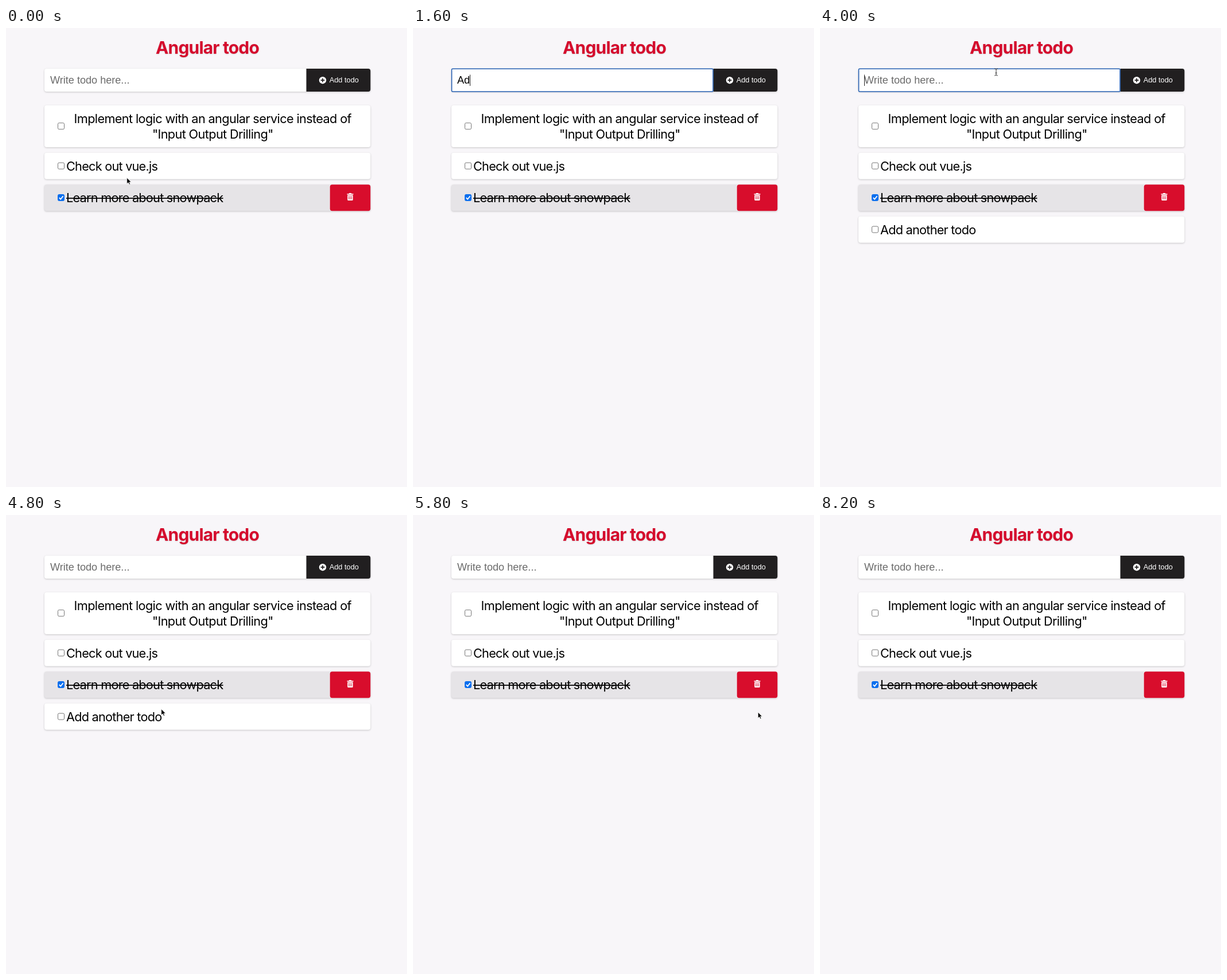
Animation, 699 px wide and 801 px high, one loop 8.4 s. Source, as an HTML page:

```html
<!DOCTYPE html>
<html lang="en">
<head>
<meta charset="utf-8">
<title>Angular todo</title>
<style>
  html, body { margin: 0; width: 100%; height: 100%; overflow: hidden; background: #f8f6f9; }
  svg { display: block; }
  text { white-space: pre; }
  .title { font: 700 30px Inter, sans-serif; letter-spacing: -.028em; fill: #d50c2d; text-shadow: 0 1px 2px #0002; }
  .label { font: 21.7px Inter, sans-serif; letter-spacing: -.035em; }
  .field { font: 18.1px "Liberation Sans", Arial, sans-serif; }
  .button { font: 12.8px "Liberation Sans", Arial, sans-serif; fill: #fff; }
  .middle { text-anchor: middle; }
  .label.middle { letter-spacing: -.029em; }
  .card { filter: drop-shadow(0 1px 1.5px #0003); }
</style>
</head>
<body>
<svg width="699" height="801" viewBox="0 0 699 801">
  <defs>
    <g id="trash">
      <path d="M-5.5 -5.2h3l.8 -1.3h3.4l.8 1.3h3v1.5h-11z" fill="#fff"/>
      <path d="M-4.7 -3h9.4v8.2q0 1.3 -1.3 1.3h-6.8q-1.3 0 -1.3 -1.3z" fill="#fff"/>
      <path d="M-2.3 -1.2v5.8M0 -1.2v5.8M2.3 -1.2v5.8" stroke="#d80d2c" stroke-width=".9"/>
    </g>
  </defs>

  <text class="title middle" x="351" y="45">Angular todo</text>

  <g class="card">
    <path d="M71 71H524V111H71q-4 0 -4 -4V75q0 -4 4 -4z" fill="#fff"/>
    <path d="M523.5 71H631.3q4 0 4 4V107q0 4 -4 4H523.5z" fill="#211f20"/>
  </g>
  <circle cx="552" cy="91.2" r="6.2" fill="#fff"/>
  <path d="M548.6 91.2h6.8M552 87.8v6.8" stroke="#211f20" stroke-width="1.7"/>
  <text class="button" x="563.7" y="95.3">Add todo</text>
  <rect id="focus" x="67.5" y="71.2" width="455.5" height="39.8" rx="1.5" fill="none" stroke="#2862b4" stroke-width="1.6"/>
  <text id="field" class="field" x="77" y="97"></text>
  <path id="caret" d="M.5 81.5v19.5" stroke="#222"/>

  <g id="list"></g>

  <path id="arrow" d="M0 0V10.6L2.5 8.4L4.1 12L5.9 11.2L4.3 7.7H7.6z" fill="#000" stroke="#fff" stroke-width=".8"/>
  <path id="beam" d="M-2.8 -6Q0 -6 0 -4.5Q0 -6 2.8 -6M0 -4.8V4.8M-2.8 6Q0 6 0 4.5Q0 6 2.8 6M-1.5 1.5H1.5" fill="none" stroke="#333"/>
</svg>
<script>
const LOOP = 8400, STEP = 200;
const TODO = "Add another todo";
const typed = [1, 2, 3, 5, 6, 7, 9, 11, 12, 14, 16]; // letters per step
const T = { focus: 1000, type: 1400, enter: 3600, blur: 4800, check: 5000, remove: 5800 };

// Pointer moves: start, end, from, to, time it stays visible until
const moves = [
  [0, 800, [210.7, 261.3], [307, 88], 1400],
  [4000, 4800, [307, 77], [270.7, 338.6], 5000],
  [5000, 5600, [270.7, 338.6], [601.3, 344], 6000]
];

const $ = id => document.getElementById(id);
const show = (id, on) => $(id).style.display = on ? "" : "none";

function checkbox(y, done) {
  const box = `x="90.5" y="${y - 5.5}" width="11" height="11" rx="2"`;
  return done
    ? `<rect ${box} fill="#0b6fee" stroke="#0b6fee"/>
       <path d="M92.8 ${y + .2}l2.4 2.6l4.4 -5.6" fill="none" stroke="#fff" stroke-width="1.8"/>`
    : `<rect ${box} fill="#fff" stroke="#767676"/>`;
}

function card(y, height, done) {
  return `<rect class="card" x="67" y="${y}" width="568.3" height="${height}" rx="4" fill="${done ? "#e6e4e7" : "#fff"}"/>`;
}

function row(y, label, done, end) {
  const mid = y + 23;
  let out = card(y, 46, done) + checkbox(mid - .2, done)
    + `<text class="label" x="105" y="${y + 31.2}">${label}</text>`;
  if (done) out += `<path d="M105 ${mid + 1}H${end}" stroke="#000" stroke-width="1.7"/>
    <rect x="563.8" y="${y}" width="71.5" height="46" rx="4" fill="#f1eff2"/>
    <rect x="564.7" y="${y}" width="70.6" height="46" rx="4" fill="#d80d2c"/>
    <use href="#trash" x="600" y="${mid - 1.7}"/>`;
  return out;
}

$("list").innerHTML = card(135, 73) + checkbox(171.2)
  + '<text class="label middle" x="360.3" y="166.4">Implement logic with an angular service instead of</text>'
  + '<text class="label middle" x="360.3" y="193.4">"Input Output Drilling"</text>'
  + row(217.8, "Check out vue.js")
  + row(273.2, "Learn more about snowpack", true, 378.5)
  + `<g id="open">${row(328.8, TODO)}</g>`
  + `<g id="done">${row(328.8, TODO, true, 274)}</g>`;

function drawPointer(t) {
  const move = moves.find(([start, , , , until]) => t >= start && t < until);
  show("arrow", false);
  show("beam", false);
  if (!move) return;
  const [start, end, from, to] = move;
  const p = Math.min(1, (t - start) / (end - start));
  const ease = p * p * (3 - 2 * p);
  const [x, y] = from.map((v, i) => v + (to[i] - v) * ease);
  const id = y > 71 && y < 111 ? "beam" : "arrow";
  show(id, true);
  $(id).setAttribute("transform", `translate(${x} ${y})`);
}

function draw(time) {
  const t = Math.floor(time % LOOP / STEP) * STEP;
  const typing = t >= T.type && t < T.enter;
  const focused = t >= T.focus && t < T.blur;
  const field = $("field");
  field.textContent = typing ? TODO.slice(0, typed[(t - T.type) / STEP]) : "Write todo here...";
  field.setAttribute("fill", typing ? "#000" : "#6b6b6b");

  const since = t - (t < T.enter ? T.focus : T.enter);
  show("focus", focused);
  show("caret", focused && (typing || since % 1000 < 500));
  const caretX = 77 + (typing ? field.getComputedTextLength() : 0);
  $("caret").setAttribute("transform", `translate(${Math.round(caretX)} 0)`);

  show("open", t >= T.enter && t < T.check);
  show("done", t >= T.check && t < T.remove);
  drawPointer(t);
}

const begin = performance.now();
function tick() {
  draw(performance.now() - begin);
  requestAnimationFrame(tick);
}
tick();
</script>
</body>
</html>
```
